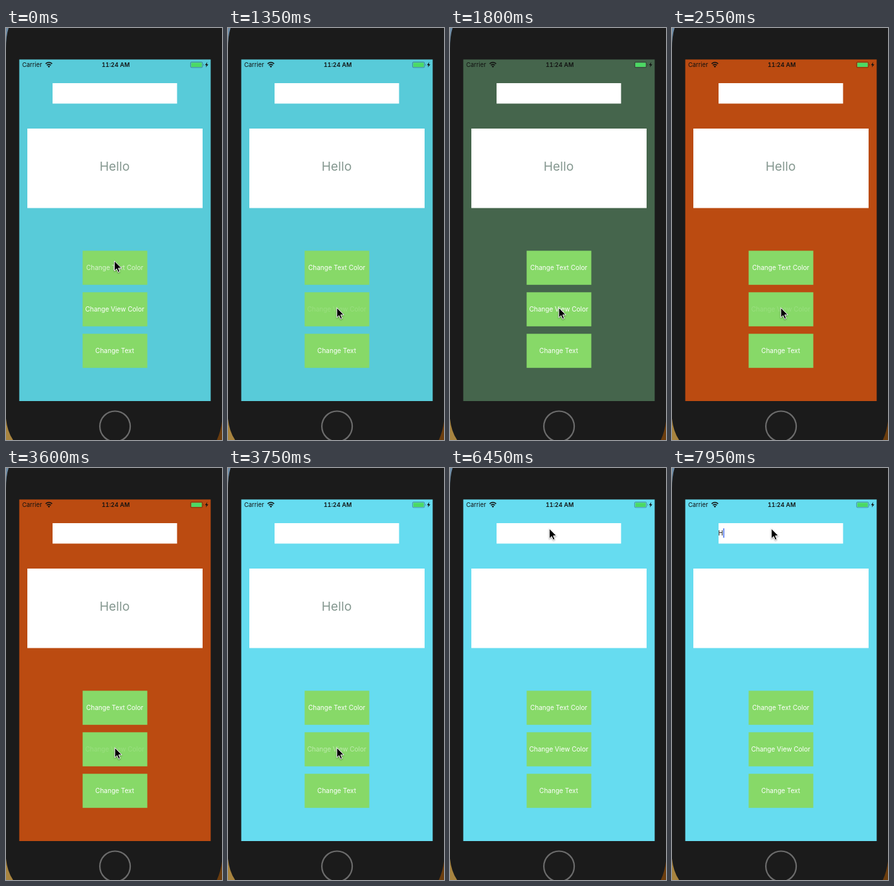
Animation of 334x635 px, one loop 8 s. Source, as an HTML page:

```html
<!DOCTYPE html>
<html lang="en">
<head>
<meta charset="utf-8">
<style>
  html, body { margin: 0; width: 100%; height: 100%; overflow: hidden; background: #1b1b1b; }
  svg { display: block; width: 334px; height: 635px; }
  text { font: 10.05px Inter, Roboto, sans-serif; }
  .mid { text-anchor: middle; }
  .carrier { font-size: 9.4px; }
  .clock { font-size: 9.1px; font-weight: 600; font-variant-numeric: tabular-nums; }
  #hello { font-size: 19.3px; }
  #cursor { filter: drop-shadow(0 1px 1px #0006); }
</style>
</head>
<body>
<svg viewBox="0 0 334 635">
  <!-- desktop showing past the phone's corners -->
  <path d="M0 0H4Q0 12 0 32Z" fill="#6f8ca5"/>
  <path d="M0 602Q2 622 11 635H0Z" fill="#a8843f"/>
  <path d="M334 606Q332 622 326 635H334Z" fill="#6b3d0e"/>
  <circle cx="168.6" cy="614" r="23.5" fill="none" stroke="#6c6c6c" stroke-width="2.2"/>
  <rect id="screen" x="20.5" y="48.5" width="296" height="526.5"/>

  <!-- status bar -->
  <g fill="#111">
    <text class="carrier" x="25" y="60">Carrier</text>
    <text class="clock mid" x="169.6" y="60">11:24 AM</text>
    <path d="M61.3 55.2Q66.3 50.8 71.3 55.2M63.2 57.4Q66.3 54.7 69.4 57.4" fill="none" stroke="#111" stroke-width="1.6"/>
    <path d="M64.4 59Q66.3 57.5 68.2 59L66.3 61Z"/>
    <rect x="285.4" y="52.5" width="18.4" height="8.4" rx="1.6" fill="none" stroke="#111" stroke-opacity=".45" stroke-width=".8"/>
    <rect x="286.5" y="53.4" width="16.2" height="6.7" rx=".6" fill="#4cd964"/>
    <path d="M305 55.2q1.4 1.5 0 3z" opacity=".6"/>
    <path d="M311.3 52.6L307.7 57.2H310L309 60.8L312.8 56H310.5Z"/>
  </g>

  <g fill="#fff">
    <rect x="72" y="85" width="192.5" height="31.5"/>
    <rect x="33" y="155" width="271" height="122.5"/>
  </g>
  <text id="hello" class="mid" x="168" y="220" fill="#84978f">Hello</text>
  <text id="typed" x="71.6" y="104" fill="#111">H</text>
  <rect id="caret" y="93" width="1.5" height="14.5" fill="#426bf2"/>

  <g id="buttons"></g>

  <path id="cursor" d="M0 0V15.4L3.5 12.1L5.9 17.5L8.4 16.4L6.1 11.1H11Z" stroke="#fff" stroke-linejoin="round"/>
</svg>
<script>
const $ = id => document.getElementById(id);
const set = (el, name, value) => el.setAttribute(name, value);
const clamp = v => Math.max(0, Math.min(1, v));
const ease = p => p * p * (3 - 2 * p);
const LOOP = 8000, STEP = 150;

const labels = ['Change Text Color', 'Change View Color', 'Change Text'];
$('buttons').innerHTML = labels.map((label, i) => {
  const y = 343.3 + 64 * i;
  return `<rect x="118.5" y="${y}" width="100" height="52.5" fill="#87d968"/>
    <text class="mid" x="168.1" y="${y + 29.7}" fill="#fff">${label}</text>`;
}).join('');
const captions = $('buttons').querySelectorAll('text');

const screens = [
  { time: 0, color: '#58cbd9' }, { time: 1500, color: '#45654c' },
  { time: 2550, color: '#bb4b11' }, { time: 3750, color: '#66dcf0' }
];

// A tapped caption drops to its low opacity, then recovers evenly
const taps = [
  { button: 0, time: 0, low: .7 },
  { button: 1, time: 1350, low: .15 },
  { button: 1, time: 2550, low: .15 },
  { button: 1, time: 3600, low: .15 },
  { button: 2, time: 5250, low: .45 }
];
const captionOpacity = (i, t) => {
  const tap = taps.findLast(p => p.button === i && p.time <= t);
  return tap ? clamp(tap.low + .3 * (t - tap.time) / STEP) : 1;
};

// Resting points of the pointer, with eased travel between them
const upper = [167.6, 359], lower = [168.2, 431], side = [149, 482];
const stops = [
  [0, upper], [300, upper], [900, lower], [4350, lower], [4500, side], [4650, side],
  [4950, [155.3, 491.7]], [6000, [178, 27]], [6450, [153.7, 93.4]], [LOOP, [153.7, 93.4]]
].map(([time, pos]) => ({ time, pos }));
const isAway = t => t >= 5700 && t < 6000;

function pointerAt(t) {
  if (t >= 4950 && t < 5700) return stops[6].pos;
  const next = stops.findIndex(s => s.time > t);
  const a = stops[next - 1], b = stops[next];
  const p = ease((t - a.time) / (b.time - a.time));
  return a.pos.map((v, i) => v + (b.pos[i] - v) * p);
}

function draw() {
  const now = performance.now() % LOOP;
  const t = Math.floor(now / STEP) * STEP;

  set($('screen'), 'fill', screens.findLast(s => s.time <= t).color);
  captions.forEach((c, i) => set(c, 'opacity', captionOpacity(i, t)));
  set($('hello'), 'opacity', +(t < 5400));

  const typed = t >= 7950;
  const blink = t < 6900 ? 0 : clamp(2 - (t - 6900) % 900 / 200);
  set($('typed'), 'opacity', +typed);
  set($('caret'), 'x', typed ? 79.3 : 72.3);
  set($('caret'), 'opacity', blink);

  set($('cursor'), 'opacity', +!isAway(t));
  set($('cursor'), 'transform', `translate(${pointerAt(t)})`);
  requestAnimationFrame(draw);
}
draw();
</script>
</body>
</html>
```
